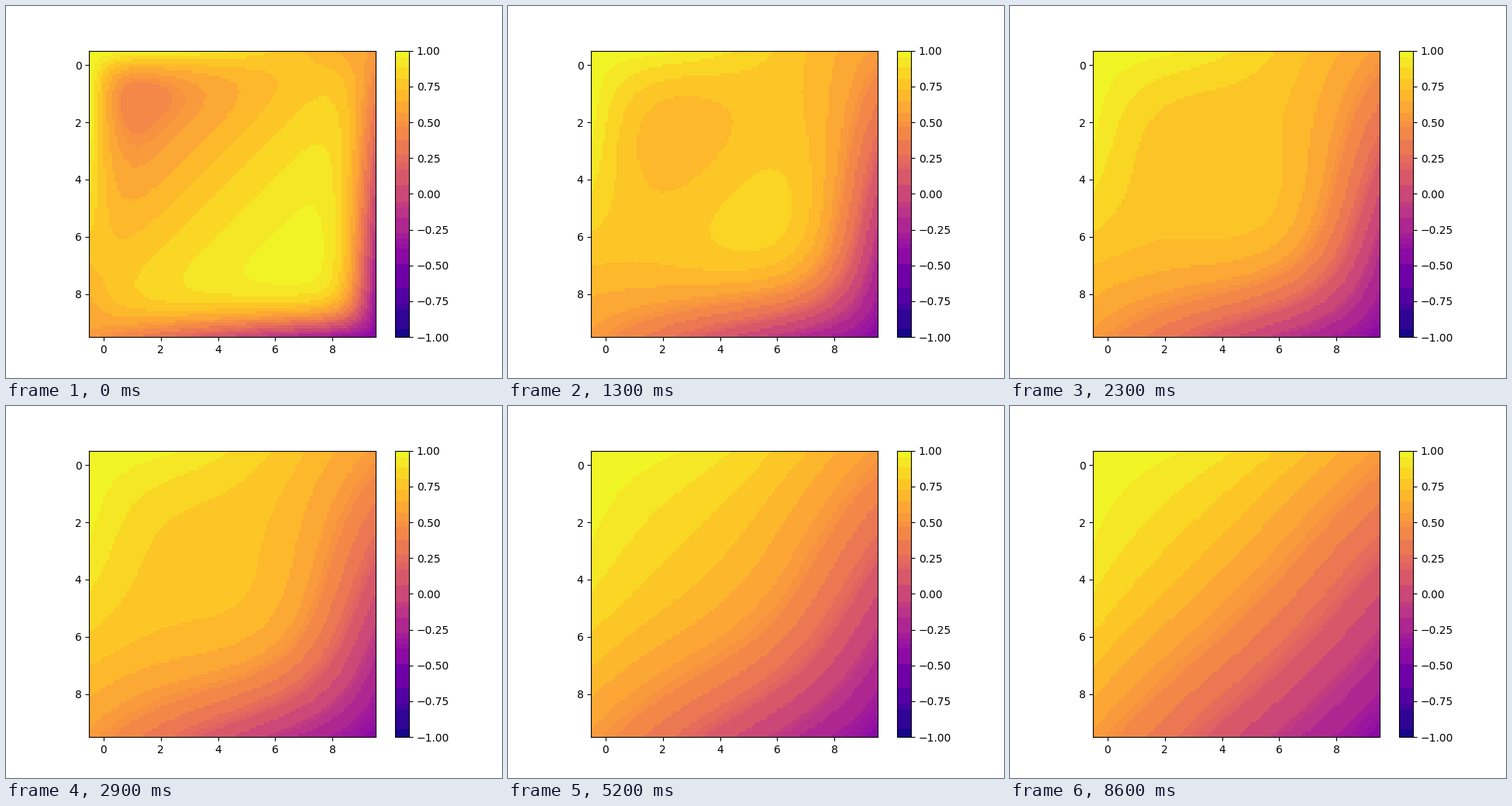
Recreate the animation shown at these times as a matplotlib script. Size 640 by 480 pixels, loop 9000 ms.

```python
import numpy as np
import matplotlib.pyplot as plt
from matplotlib.animation import FuncAnimation
from matplotlib.colors import ListedColormap

N = 100             # grid points per side
FRAMES = 90
RATE = 0.2          # diffusion number of one step
STEPS = 50          # steps per frame
LEAD = 175          # steps taken before the first frame
CELL_AREA = (370 / N) ** 2
BAR_AREA = 18.5 * 370 / 256

PLASMA = np.round(plt.get_cmap("plasma")(np.arange(256))[:, :3] * 255).astype(int)


def diffuse(u, steps):
    """Explicit heat steps with fixed edges."""
    for _ in range(steps):
        mid = u[1:-1, 1:-1]
        around = u[:-2, 1:-1] + u[2:, 1:-1] + u[1:-1, :-2] + u[1:-1, 2:]
        u[1:-1, 1:-1] = mid + RATE * (around - 4 * mid)


def simulate():
    x = np.linspace(0, 1, N)
    s = x[:, None] + x[None, :]
    u = np.cos(s)
    u[1:-1, 1:-1] = np.sin(s)[1:-1, 1:-1]
    diffuse(u, LEAD)
    fields = []
    for _ in range(FRAMES):
        fields.append(u.copy())
        diffuse(u, STEPS)
    return fields


# Colours sharing the same coarse RGB box are merged into one band.
r, g, b = PLASMA.T
_, BOX = np.unique((r >> 5) * 128 + (g >> 4) * 8 + (b >> 5), return_inverse=True)
BOX = BOX.ravel()


def banded_cmap(u):
    """Plasma in bands, each the area-weighted mean of its colours."""
    level = np.clip((u + 1) * 128, 0, 255).astype(int)
    area = np.bincount(level.ravel(), minlength=256) * CELL_AREA + BAR_AREA
    total = np.bincount(BOX, area)
    mean = [np.bincount(BOX, area * channel) / total for channel in PLASMA.T]
    return ListedColormap(np.floor(np.stack(mean, axis=1))[BOX] / 255)


fields = simulate()

fig, ax = plt.subplots(figsize=(6.4, 4.8), dpi=100)
image = ax.imshow(fields[0], cmap=banded_cmap(fields[0]), vmin=-1, vmax=1,
                  extent=(-0.5, 9.5, 9.5, -0.5), interpolation="nearest")
fig.colorbar(image, ax=ax)


def update(k):
    image.set_data(fields[k])
    image.set_cmap(banded_cmap(fields[k]))
    return [image]


anim = FuncAnimation(fig, update, frames=FRAMES, interval=100,
                     repeat=True, repeat_delay=0, blit=False)
plt.show()
```
